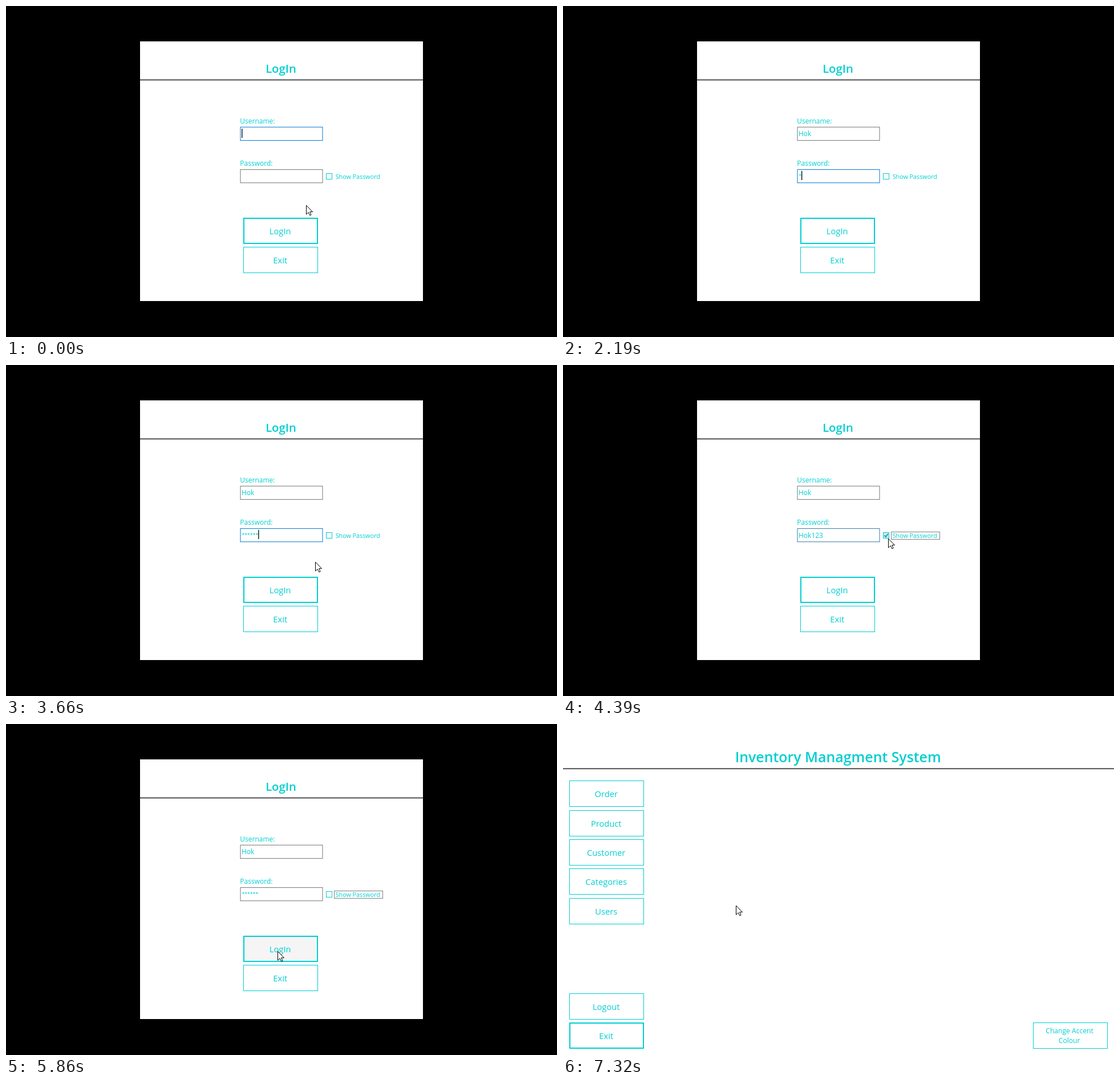
Write an HTML page that moves like this. It is 966x580 px and loops after 8 s.

```html
<!DOCTYPE html>
<html lang="en">
<head>
<meta charset="utf-8">
<title>Login</title>
<style>
  html, body { margin: 0; width: 100%; height: 100%; overflow: hidden; background: #000; }
  svg { display: block; }
  text { font-family: "Open Sans", "Noto Sans", sans-serif; fill: #00ced1; white-space: pre; }
</style>
</head>
<body>
<svg id="stage" width="966" height="580" viewBox="0 0 966 580"></svg>
<script>
const ACCENT = '#00ced1', GREY = '#767676', FOCUS = '#0078d7';
const LOOP = 8000, USER = 'Hok';
const stage = document.getElementById('stage');

const fill = (x, y, w, h, color) =>
  `<rect x="${x}" y="${y}" width="${w}" height="${h}" fill="${color}"/>`;
const box = (x, y, w, h, color = ACCENT, line = 1, back = 'none', extra = '') =>
  `<rect x="${x}" y="${y}" width="${w}" height="${h}" fill="${back}" stroke="${color}" stroke-width="${line}" ${extra}/>`;
const label = (x, y, size, str, anchor = 'start', weight = 400) =>
  `<text x="${x}" y="${y}" font-size="${size}" text-anchor="${anchor}" font-weight="${weight}">${str}</text>`;
const caret = (x, y) => fill(x, y, 1.3, 16, '#000');

// Button with outer top-left corner at x, y; the default button has a double border
function button(x, y, str, strong = false, back = '#fff') {
  const frame = strong ? box(x + 1, y + 1, 129, 44, ACCENT, 2, back)
                       : box(x + .5, y + .5, 130, 45, ACCENT, 1, back);
  return frame + label(x + 64.7, y + 29, 14.7, str, 'middle');
}

function pointer([x, y]) {
  return `<path transform="translate(${x + .5} ${y + .3})" fill="#fff" stroke="#000"
    d="M0 0V15.8L3.7 12.4L6.3 17.6L8.6 16.6L6.2 11.4H11Z"/>`;
}

function checkbox({ hover, checked, ring }) {
  return box(561.5, 293.5, 10, 10, ACCENT, 1, hover ? '#d9e6e9' : '#fff')
    + (checked ? '<path d="M563.5 298.5L566 301L570 295.5" fill="none" stroke="#00a9b4" stroke-width="1.8"/>' : '')
    + label(577.7, 303, 10.75, 'Show Password')
    + (ring ? box(575.5, 292.5, 85, 13, '#000', 1, 'none', 'stroke-dasharray="1 1"') : '');
}

function login(s) {
  return fill(0, 0, 966, 580, '#000')
    + fill(235, 62, 496, 455, '#fff')
    + label(482, 117.2, 20.3, 'LogIn', 'middle', 600)
    + fill(235, 128.6, 496, 1.8, '#404040')
    + label(410.3, 206, 12, 'Username:')
    + box(411, 212.2, 144, 23.4, s.userEdge || GREY)
    + label(413, 228, 12, s.user ?? USER)
    + label(410.3, 280, 12, 'Password:')
    + box(411, 286.6, 144, 23.2, s.passEdge || GREY)
    + (s.checked ? label(413, 302.8, 12, USER + '123')
                 : label(413.5, 301, 8.7, '*'.repeat(s.stars || 0)))
    + checkbox(s)
    + button(416, 371, 'LogIn', true, s.hot ? '#f5f5f5' : '#fff')
    + button(416, 422, 'Exit')
    + (s.caret ? caret(...s.caret) : '');
}

function menu() {
  const items = ['Order', 'Product', 'Customer', 'Categories', 'Users'];
  return fill(0, 0, 966, 580, '#fff')
    + label(482.2, 66.8, 24.9, 'Inventory Managment System', 'middle', 600)
    + fill(0, 77.4, 966, 1.8, '#404040')
    + items.map((name, i) => button(11, Math.round(99.4 + 51.3 * i), name)).join('')
    + button(11, 472, 'Logout')
    + button(11, 523, 'Exit', true)
    + button(824, 523, '')
    + label(888, 542.4, 12.1, 'Change Accent', 'middle')
    + label(887.6, 558.6, 12.1, 'Colour', 'middle');
}

// Each step holds from its start time until the next one
const steps = [
  { at: 0, user: '', userEdge: FOCUS, caret: [413.2, 215], mouse: [526, 349] },
  { at: 1460, userEdge: FOCUS, caret: [436.5, 215] },
  { at: 2190, stars: 1, passEdge: FOCUS, caret: [418, 289] },
  { at: 2920, stars: 4, passEdge: FOCUS, caret: [432.8, 289] },
  { at: 3660, stars: 6, passEdge: FOCUS, caret: [442.2, 289], mouse: [542, 345] },
  { at: 4390, checked: true, hover: true, ring: true, passEdge: '#3a78a8', mouse: [570, 304] },
  { at: 5130, stars: 6, hover: true, ring: true, mouse: [570, 304] },
  { at: 5860, stars: 6, ring: true, hot: true, mouse: [476, 398] },
  { at: 6590, menu: true, mouse: [353, 362] },
  { at: 7320, menu: true, mouse: [303, 318] }
];

let shown;
const start = performance.now();
function draw(now) {
  const t = Math.max(0, now - start) % LOOP;
  const step = steps.findLast(s => s.at <= t);
  if (step !== shown) {
    shown = step;
    stage.innerHTML = (step.menu ? menu() : login(step)) + (step.mouse ? pointer(step.mouse) : '');
  }
  requestAnimationFrame(draw);
}
draw(start);
</script>
</body>
</html>
```
